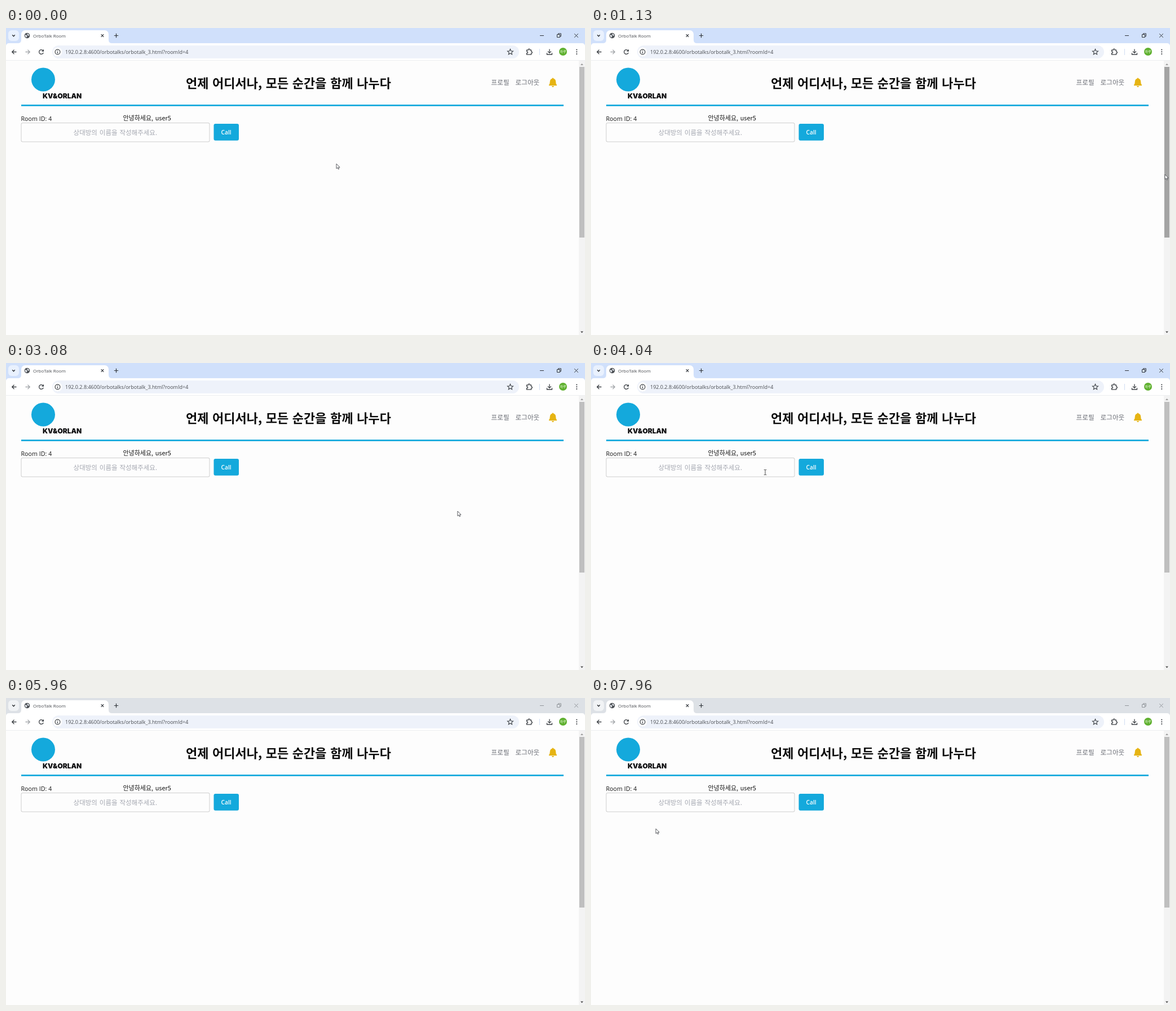
Recreate the animation shown at these times as an HTML page with a canvas. Size 1027x545 px, loop 8000 ms.

```html
<!DOCTYPE html>
<html lang="ko">
<head>
<meta charset="utf-8">
<title>OrboTalk Room</title>
<style>
html, body { margin: 0; width: 100%; height: 100%; overflow: hidden; background: #fdfdfd; }
canvas { display: block; }
</style>
</head>
<body>
<canvas id="stage" width="1027" height="545"></canvas>
<script>
const ctx = document.getElementById('stage').getContext('2d');
const LOOP = 8000;
const BLUR_AT = 5830;
const KR = '"Noto Sans CJK KR", "Noto Sans CJK", sans-serif';
const LATIN = '"Open Sans", "Noto Sans", sans-serif';
const BLUE = '#14a9dc';

// Pointer stops: time, x, y; straight moves between them.
const POINTER = [
  [0, 586, 241], [210, 586, 241], [500, 404, 287], [710, 310, 388],
  [1050, 310, 388], [1130, 1018, 260], [2250, 1018, 260], [2290, 1009, 280],
  [2440, 1009, 280], [2580, 801, 263], [3500, 801, 263]
];
const RETURN = [[7560, 185, 214], [7960, 115, 232], [8000, 115, 232]];

function along(stops, t) {
  for (let i = 1; i < stops.length; i++) {
    const [t0, x0, y0] = stops[i - 1];
    const [t1, x1, y1] = stops[i];
    if (t <= t1) {
      const k = (t - t0) / (t1 - t0);
      return [x0 + (x1 - x0) * k, y0 + (y1 - y0) * k];
    }
  }
  return stops[stops.length - 1].slice(1);
}

function pointerAt(t) {
  if (t < 3520) return { kind: 'arrow', pos: along(POINTER, t) };
  if (t < 5650) return { kind: 'beam', pos: [309, 194] };
  if (t >= RETURN[0][0]) return { kind: 'arrow', pos: along(RETURN, t) };
  return null;
}

function box(x, y, w, h, color, radius = 0) {
  ctx.fillStyle = color;
  ctx.beginPath();
  ctx.roundRect(x, y, w, h, radius);
  ctx.fill();
}

function disc(x, y, r, color) {
  ctx.fillStyle = color;
  ctx.beginPath();
  ctx.arc(x, y, r, 0, Math.PI * 2);
  ctx.fill();
}

function stroke(d, color, width = 1.2, x = 0, y = 0) {
  ctx.save();
  ctx.translate(x, y);
  ctx.strokeStyle = color;
  ctx.lineWidth = width;
  ctx.stroke(new Path2D(d));
  ctx.restore();
}

function fill(d, color, x = 0, y = 0) {
  ctx.save();
  ctx.translate(x, y);
  ctx.fillStyle = color;
  ctx.fill(new Path2D(d));
  ctx.restore();
}

function text(str, x, y, font, color, { align = 'left', gap = 0 } = {}) {
  ctx.font = font;
  ctx.fillStyle = color;
  ctx.textAlign = align;
  ctx.wordSpacing = gap + 'px';
  ctx.fillText(str, x, y);
}

function globe(x, y) {
  disc(x, y, 4.8, '#4d5156');
  fill('M-3.6 -1.5L-1 -1L0 1L-1.5 3.6Q-4 2 -3.6 -1.5ZM0 -3.8Q3 -3.4 3.7 -.6L1.8 .4L.3 -1.2Z', '#e4e8ee', x, y);
}

function tabStrip(active) {
  const ink = active ? '#30343a' : '#92969b';
  box(0, 0, 1027, 36, active ? '#d0e0fb' : '#dde1e6');
  box(4, 4, 19, 19, active ? '#e9f1fe' : '#f1f3f5', 6);
  stroke('M-2.3 -1.2L0 1.2L2.3 -1.2', '#25282c', 1.3, 13.5, 13.5);

  box(27, 4, 155, 30, '#fff', 7);
  fill('M21 27Q27 27 27 21V27ZM188 27Q182 27 182 21V27Z', '#fff');
  globe(37.5, 13.5);
  text('OrboTalk Room', 48, 17.3, '8px ' + LATIN, '#484b50');
  stroke('M-2.3 -2.3L2.3 2.3M2.3 -2.3L-2.3 2.3', '#30343a', 1.2, 171, 13.5);
  stroke('M-3.7 0H3.7M0 -3.7V3.7', '#30343a', 1.2, 195.5, 13.5);

  stroke('M947 13.5H954', ink, 1);
  stroke('M977.5 11.5H982.5V16.5H977.5ZM979.5 11V9.8H984.4V14.8H983', ink, 1);
  stroke('M-3.3 -3.3L3.3 3.3M3.3 -3.3L-3.3 3.3', ink, 1, 1011.5, 13.5);
}

function toolbar() {
  const ink = '#3c4045';
  box(0, 27, 1027, 31, '#fff', [5, 5, 0, 0]);
  box(0, 57, 1027, 1, '#eceef0');
  stroke('M4 0H-3.7M0 -3.8L-3.8 0L0 3.8', ink, 1.3, 14.5, 42.5);
  stroke('M-4 0H3.7M0 -3.8L3.8 0L0 3.8', '#a4a7ab', 1.3, 38.5, 42.5);
  stroke('M3.4 -2A3.9 3.9 0 1 0 3.8 1.2M3.9 -4.2V-1.3H1', ink, 1.3, 62.5, 42.5);

  box(82, 31, 828, 23, '#eef2fa', 11.5);
  disc(91.5, 42.5, 8, '#fff');
  stroke('M-4.4 0A4.4 4.4 0 1 0 4.4 0A4.4 4.4 0 1 0 -4.4 0M0 -.5V2.4M0 -2.6V-1.4', ink, 1.2, 91.5, 42.5);
  text('192.0.2.8:4600/orbotalks/orbotalk_3.html?roomId=4', 105, 45.8, '9px ' + LATIN, '#4a4d52');

  stroke('M0 -5L1.4 -1.7L5 -1.4L2.3 .9L3.1 4.4L0 2.5L-3.1 4.4L-2.3 .9L-5 -1.4L-1.4 -1.7Z', ink, 1.1, 894.5, 42.5);
  stroke('M-4.4 -3.3H-1.6Q-1.8 -5.3 -.2 -5.3Q1.4 -5.3 1.2 -3.3H3.6V-.6Q5.4 -.7 5.4 .9Q5.4 2.4 3.6 2.3V4.6H-4.4V2.2Q-2.5 2.2 -2.5 .7Q-2.5 -.8 -4.4 -.8Z', ink, 1.3, 928, 42.5);
  box(946, 37, 1, 11, '#cfdcf3');
  stroke('M0 -5V1.7M-3 -1.1L0 1.9L3 -1.1M-4.5 1.8V4.5H4.5V1.8', ink, 1.3, 964, 42.5);
  disc(988, 42, 7, '#5fb02f');
  text('하루', 988, 44.3, '6px ' + KR, '#f3ffe9', { align: 'center' });
  for (const y of [38.5, 42.3, 46.1]) disc(1012.3, y, 1.1, ink);
}

function header() {
  disc(66, 91.5, 21, BLUE);
  text('KV&ORLAN', 65, 124.6, '900 12px Inter, sans-serif', '#0c0c0e');
  text('언제 어디서나, 모든 순간을 함께 나누다', 319, 106, 'bold 22px ' + KR, '#0b0b0b', { gap: 1.6 });
  text('프로필', 860.6, 101.3, '11.6px ' + KR, '#6a6d75');
  text('로그아웃', 903.6, 101.3, '11.6px ' + KR, '#6a6d75');
  fill('M-1.2 -7.2A1.2 1.2 0 0 1 1.2 -7.2Q5.2 -6 5.2 -1.5Q5.2 2.2 7 4V5.2H-7V4Q-5.2 2.2 -5.2 -1.5Q-5.2 -6 -1.2 -7.2ZM-2 6H2Q1.7 8 0 8Q-1.7 8 -2 6Z', '#e6b413', 970, 97);
  box(27, 136, 962, 2.7, BLUE);
}

function callForm() {
  text('Room ID: 4', 26.5, 164.5, '10.7px ' + LATIN, '#161616');
  text('안녕하세요, user5', 207.5, 164.4, '11px ' + KR, '#161616', { gap: 1 });
  box(26.5, 168, 335, 34.5, '#cfcfcf', 3);
  box(27.5, 169, 333, 32.5, '#fdfdfd', 2);
  text('상대방의 이름을 작성해주세요.', 119.6, 189.5, '11.5px ' + KR, '#a5a8b1', { gap: 1.3 });
  box(368.5, 170, 44.5, 29.7, BLUE, 3);
  text('Call', 390.6, 189, '600 10.2px ' + LATIN, '#fff', { align: 'center' });
}

function scrollbar(hover) {
  box(1016, 58, 11, 487, '#f3f3f3');
  box(1017, 69, 9, 303, hover ? '#a4a4a4' : '#bfbfbf');
  fill('M-2.5 1.4L0 -1.4L2.5 1.4Z', '#9b9b9b', 1021.5, 64.5);
  fill('M-2.5 -1.4L0 1.4L2.5 -1.4Z', '#505050', 1021.5, 540);
}

function pointer({ kind, pos: [x, y] }) {
  if (kind === 'beam') {
    stroke('M-2.2 -4.5H-.6L0 -4L.6 -4.5H2.2M0 -4V4M-2.2 4.5H-.6L0 4L.6 4.5H2.2', '#4a4a4a', 1, x, y);
    return;
  }
  const shape = 'M0 0V8.6L2 6.8L3.4 9.8L4.8 9.1L3.5 6.3H6.1Z';
  fill(shape, '#fff', x, y);
  stroke(shape, '#4a4c52', 0.9, x, y);
}

function draw(t) {
  const cursor = pointerAt(t);
  box(0, 0, 1027, 545, '#fdfdfd');
  tabStrip(t < BLUR_AT);
  toolbar();
  header();
  callForm();
  scrollbar(cursor !== null && cursor.pos[0] >= 1014);
  if (cursor) pointer(cursor);
}

const start = performance.now();
function tick() {
  draw((performance.now() - start) % LOOP);
  requestAnimationFrame(tick);
}
tick();
</script>
</body>
</html>
```
